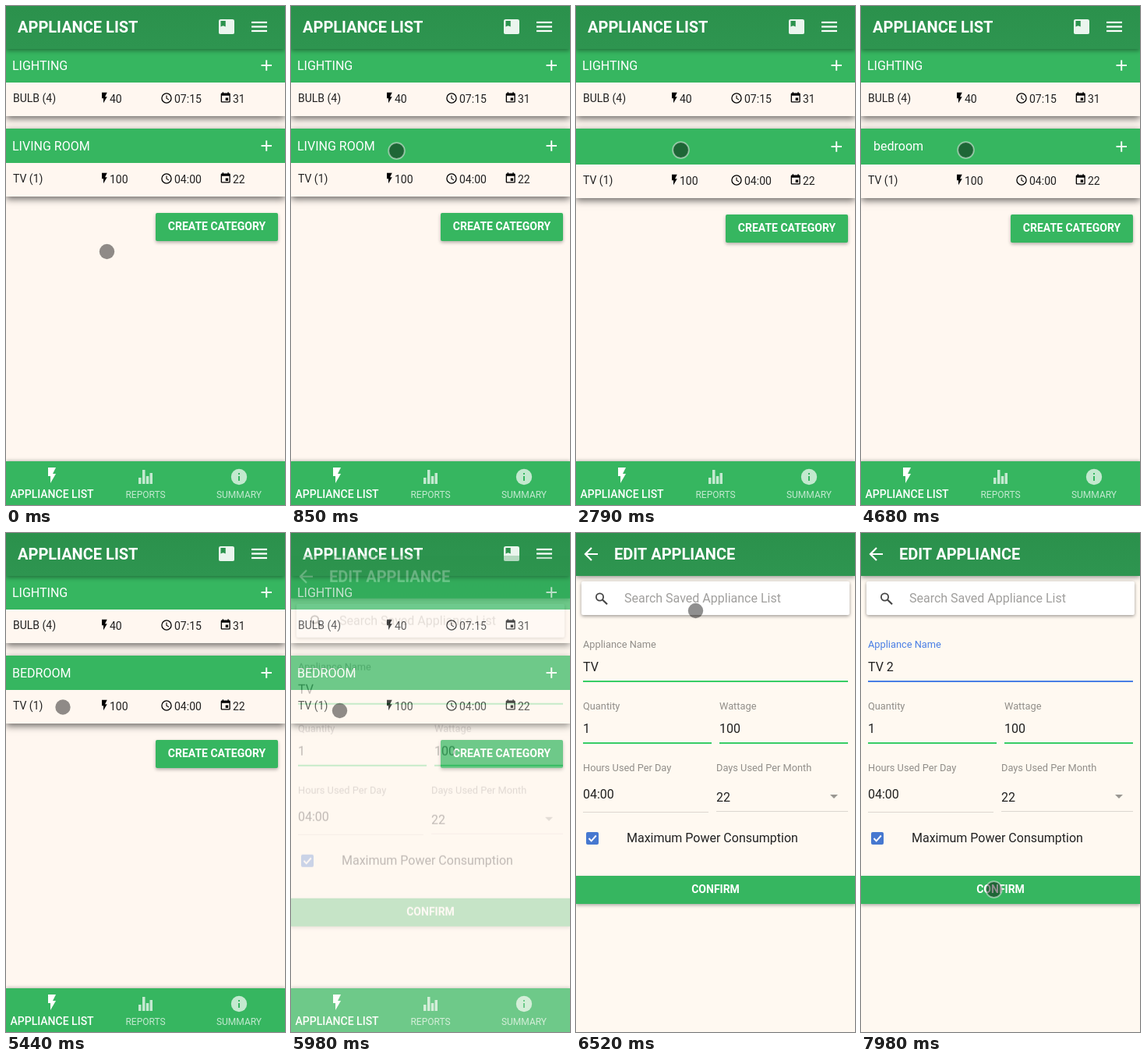
Write an HTML page with a canvas that moves like this. It is 358 by 639 pixels and loops after 8000 ms.

```html
<!DOCTYPE html>
<html lang="en">
<head>
<meta charset="utf-8">
<title>Appliance list</title>
<style>
  html, body { margin: 0; width: 100%; height: 100%; overflow: hidden; background: #fff7f0; }
  canvas { display: block; width: 358px; height: 639px; }
</style>
</head>
<body>
<canvas id="stage"></canvas>
<script>
const W = 358, H = 639, LOOP = 8000;
const GREEN = '#36b660', INK = '#212121', BLUE = '#4a7fe5';
const dpr = window.devicePixelRatio || 1;

function setup(canvas) {
  canvas.width = W * dpr;
  canvas.height = H * dpr;
  const context = canvas.getContext('2d');
  context.scale(dpr, dpr);
  return context;
}
const stage = setup(document.getElementById('stage'));
const editLayer = document.createElement('canvas');
const editCtx = setup(editLayer);
let c = stage;

const ICON = {
  bolt: new Path2D('M7 2v11h3v9l7-12h-4l4-8z'),
  event: new Path2D('M17 12h-5v5h5zM16 1v2H8V1H6v2H5Q3 3 3 5V19q0 2 2 2h14q2 0 2-2V5q0-2-2-2h-1V1zM19 19H5V8h14z'),
  book: new Path2D('M18 2H6Q4 2 4 4v16q0 2 2 2h12q2 0 2-2V4q0-2-2-2zM6 4h5v8l-2.5-1.5L6 12z'),
  back: new Path2D('M20 11H7.83l5.59-5.59L12 4l-8 8 8 8 1.41-1.41L7.83 13H20z')
};

// Timed states: the last entry whose time has passed is in force.
const LIST_NAME = [
  [0, 'LIVING ROOM'], [1550, 'LIVING ROO'], [2020, 'LIVING R'], [2100, 'LIVING'],
  [2180, 'LIVI'], [2250, 'LI'], [2330, ''], [3190, 'b'], [3260, 'be'], [3490, 'bed'],
  [3660, 'bedr'], [3730, 'bedro'], [3900, 'bedroo'], [4200, 'bedroom'], [5050, 'BEDROOM']
];
const LIST_CARET = [[0, 0], [1240, 1], [1870, 0], [2020, 1], [2790, 0], [3190, 1], [4680, 0]];
const APPLIANCE_NAME = [[0, 'TV'], [7290, 'TV '], [7370, 'TV 2']];
const EDIT_CARET = [[0, 0], [6830, 1], [7850, 0]];
const PRESSED = [[0, 0], [840, 1], [4720, 0], [5000, 1], [5110, 0], [6830, 1], [7450, 0], [7900, 1]];
const POINTER = [
  [150, 129.5, 314.5], [840, 135.5, 185.5], [1090, 134.5, 184.5], [4680, 134.5, 184.5],
  [5000, 126, 362], [5110, 126, 362], [5440, 73, 223], [5520, 64, 218], [5700, 64, 218],
  [5830, 62.5, 227.5], [6060, 62.5, 227.5], [6520, 153.5, 99.5], [6750, 158, 172],
  [7430, 158, 172], [7900, 170.5, 456.5]
];

const stateAt = (states, t) => states.reduce((now, [at, value]) => t >= at ? value : now, states[0][1]);

function pointerAt(t) {
  const next = POINTER.findIndex(k => k[0] > t);
  if (next < 0) return POINTER[POINTER.length - 1].slice(1);
  if (next === 0) return POINTER[0].slice(1);
  const [t0, x0, y0] = POINTER[next - 1], [t1, x1, y1] = POINTER[next];
  const u = (t - t0) / (t1 - t0), e = u * u * (3 - 2 * u);
  return [x0 + (x1 - x0) * e, y0 + (y1 - y0) * e];
}

// cubic-bezier(.36, .66, .04, 1)
function pageEase(x) {
  if (x >= 1) return 1;
  const curve = (s, a, b) => 3 * a * s * (1 - s) ** 2 + 3 * b * s * s * (1 - s) + s ** 3;
  let lo = 0, hi = 1;
  for (let i = 0; i < 24; i++) {
    const mid = (lo + hi) / 2;
    if (curve(mid, .36, .04) < x) lo = mid; else hi = mid;
  }
  return curve(lo, .66, 1);
}

function rect(x, y, w, h, color) {
  c.fillStyle = color;
  c.fillRect(x, y, w, h);
}

function text(str, x, y, size, color = INK, weight = 400, align = 'left') {
  c.font = `${weight} ${size}px Roboto, sans-serif`;
  c.fillStyle = color;
  c.textAlign = align;
  c.fillText(str, x, y);
  return c.measureText(str).width;
}

function icon(path, x, y, sx, color, sy = sx) {
  c.save();
  c.translate(x, y);
  c.scale(sx, sy);
  c.fillStyle = color;
  c.fill(path, 'evenodd');
  c.restore();
}

function line(points, color, width) {
  c.beginPath();
  points.forEach(([x, y]) => c.lineTo(x, y));
  c.strokeStyle = color;
  c.lineWidth = width;
  c.stroke();
}

function disc(x, y, r, color) {
  c.beginPath();
  c.arc(x, y, r, 0, 7);
  c.fillStyle = color;
  c.fill();
}

function ring(x, y, r, color, width) {
  c.beginPath();
  c.arc(x, y, r, 0, 7);
  c.strokeStyle = color;
  c.lineWidth = width;
  c.stroke();
}

function card(x, y, w, h, color, radius, blur, drop, alpha) {
  c.save();
  c.shadowColor = `rgba(0,0,0,${alpha})`;
  c.shadowBlur = blur * dpr;
  c.shadowOffsetY = drop * dpr;
  c.fillStyle = color;
  c.beginPath();
  c.roundRect(x, y, w, h, radius);
  c.fill();
  c.restore();
}

function header(title, x) {
  const shade = c.createLinearGradient(0, 0, 0, 55);
  shade.addColorStop(0, '#2b914c');
  shade.addColorStop(1, '#2e9550');
  card(0, 0, W, 55, shade, 0, 6, 2, .4);
  text(title, x, 34, 20, '#fff', 700);
}

function applianceRow(y, name, watts, hours, days) {
  text(name, 9, y + 5, 14);
  icon(ICON.bolt, 118.3, y - 8.5, .67, '#000');
  text(watts, 133, y + 6, 14);
  ring(206, y, 6.1, '#000', 1.3);
  line([[206, y - 3.5], [206, y + .3], [209, y + 2.1]], '#000', 1.1);
  text(hours, 216, y + 6, 14);
  icon(ICON.event, 273.7, y - 8.5, .67, '#000');
  text(days, 291, y + 6, 14);
}

function category(y, headHeight, plusY) {
  card(0, y, W, headHeight + 43, '#fff7f0', 0, 9, 3, .6);
  rect(0, y, W, headHeight, GREEN);
  rect(327.5, plusY - 1, 13.5, 2, '#f2fbf5');
  rect(333.2, plusY - 6.7, 2, 13.5, '#f2fbf5');
}

function tabBar() {
  const dim = 'rgba(255,255,255,.7)';
  card(0, 583, W, 56, GREEN, 0, 4, -1, .25);
  icon(ICON.bolt, 47, 589, 1, '#fff');
  text('APPLIANCE LIST', 59, 630, 14, '#fff', 500, 'center');
  [[170, 604], [175, 594], [179.8, 602], [184.5, 598]].forEach(([x, y]) => rect(x, y, 3.5, 612 - y, dim));
  text('REPORTS', 179, 630, 12, dim, 400, 'center');
  disc(299, 603, 10.2, dim);
  rect(298, 598, 2, 2, GREEN);
  rect(298, 602, 2, 6, GREEN);
  text('SUMMARY', 299, 630, 12, dim, 400, 'center');
}

function drawList(t) {
  const editing = t >= 920 && t < 5050, grow = editing ? 2 : 0;
  rect(0, 0, W, H, '#fff7f0');

  category(55, 43, 76);
  text('LIGHTING', 8, 82, 16, '#fff');
  applianceRow(118, 'BULB (4)', '40', '07:15', '31');

  category(157, 44 + grow, 179 + grow / 2);
  const nameX = editing ? 16 : 8;
  const width = text(stateAt(LIST_NAME, t), nameX, 185, 16, '#fff');
  if (editing && stateAt(LIST_CARET, t)) rect(Math.round(nameX + width), 170, 1, 19, '#fff');
  applianceRow(221 + grow, 'TV (1)', '100', '04:00', '22');

  card(192, 265 + grow, 157, 36, GREEN, 2, 4, 2, .3);
  text('CREATE CATEGORY', 270.5, 287 + grow, 14, '#fff', 700, 'center');

  header('APPLIANCE LIST', 15);
  icon(ICON.book, 268, 15.2, 1.25, '#eaf5ee', .95);
  [21, 26.5, 32].forEach(y => rect(315, y - 1.1, 20, 2.2, '#fff'));
  tabBar();
}

function drawEdit(t) {
  const focused = t >= 6830, label = '#918e89';
  rect(0, 0, W, H, '#fff9f1');
  header('EDIT APPLIANCE', 49);
  icon(ICON.back, 6, 13.8, 1.1, '#fff');

  card(7, 62, 344, 43, '#fff', 2, 4, 1.5, .4);
  ring(30.5, 82, 4.6, '#444', 1.8);
  line([[34, 85.5], [40, 91.3]], '#444', 2.2);
  text('Search Saved Appliance List', 62, 89, 16, '#a09f9d');

  text('Appliance Name', 9, 147, 12.8, focused ? BLUE : label);
  const name = stateAt(APPLIANCE_NAME, t);
  const width = text(name, 9, 177, 16);
  if (stateAt(EDIT_CARET, t)) rect(Math.round(9 + width), 162, 1, 19, INK);
  rect(9, 189, 340, 2, focused ? BLUE : '#38cd66');

  text('Quantity', 9, 226, 12.8, label);
  text('1', 9, 256, 16);
  rect(9, 268, 165, 2, '#38cd66');
  text('Wattage', 184, 226, 12.8, label);
  text('100', 184, 256, 16);
  rect(184, 268, 165, 2, '#38cd66');

  text('Hours Used Per Day', 9, 305, 12.8, label);
  text('04:00', 9, 340, 16);
  rect(9, 357, 161, 1, '#dcd7d0');
  text('Days Used Per Month', 180, 305, 12.8, label);
  text('22', 180, 344, 16);
  rect(180, 356, 169, 1, '#dcd7d0');
  c.fillStyle = '#9a9792';
  c.fill(new Path2D('M326 335h10l-5 5z'));

  card(13, 383, 16, 16, '#4678d0', 2, 0, 0, 0);
  line([[16.5, 391], [19.7, 394.3], [25.8, 387.5]], '#fff', 1.9);
  text('Maximum Power Consumption', 65, 396, 16);

  card(0, 439, W, 36, GREEN, 0, 4, 2, .3);
  text('CONFIRM', 179, 461, 14, '#fff', 700, 'center');
}

function drawPointer(t) {
  const [x, y] = pointerAt(t);
  const pressed = stateAt(PRESSED, t);
  disc(x, y, pressed ? 10.5 : 9.7, 'rgba(0,0,0,.44)');
  if (pressed) ring(x, y, 10.3, 'rgba(255,255,255,.5)', 1.8);
}

function draw(t) {
  c = stage;
  if (t < 6230) drawList(t);
  if (t >= 5980) {
    const shown = pageEase((t - 5946) / 280);
    c = editCtx;
    drawEdit(t);
    c = stage;
    c.globalAlpha = shown;
    c.drawImage(editLayer, 0, 40 * (1 - shown), W, H);
    c.globalAlpha = 1;
  }
  drawPointer(t);
}

function tick() {
  draw(performance.now() % LOOP);
  requestAnimationFrame(tick);
}
tick();
</script>
</body>
</html>
```
